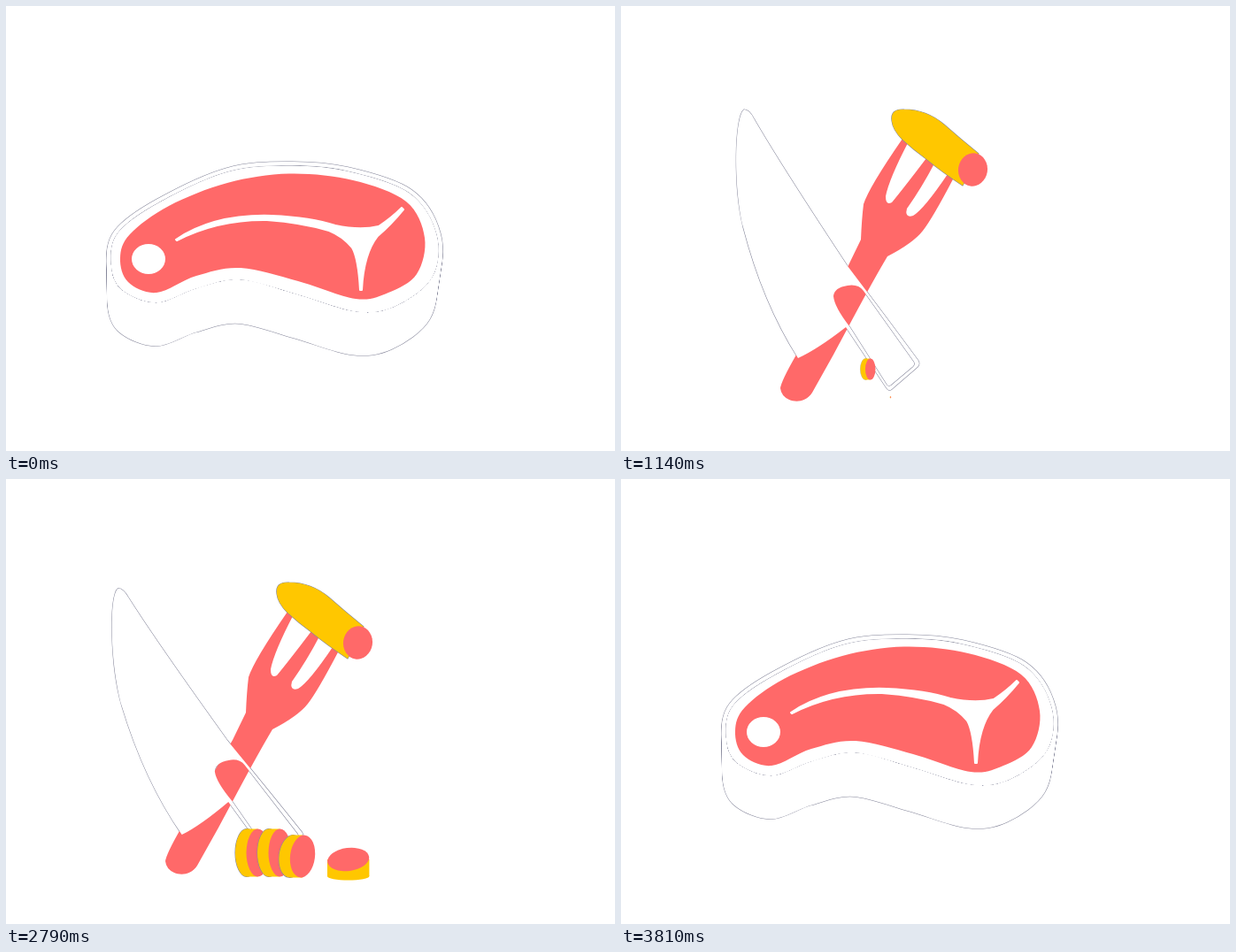
Write an HTML page with a canvas that moves like this. It is 688 px wide and 503 px high and loops after 3.84 s.

```html
<!DOCTYPE html>
<html lang="en">
<head>
<meta charset="utf-8">
<title>Steak and sausage</title>
<style>
  html, body { margin: 0; width: 100%; height: 100%; overflow: hidden; background: #fff; }
  canvas { display: block; }
</style>
</head>
<body>
<canvas width="688" height="503"></canvas>
<script>
const LOOP = 3840, STEP = 30, LAYERS = 24;
const RED = '#ff6969', YELLOW = '#ffc700', WHITE = '#fff', HAIR = '#85869a';
const ctx = document.querySelector('canvas').getContext('2d');

// Key points of the steak: lying at rest, then thrown up.
const rim = [
  '118 292 126 256 172 222 250 187 320 180 385 186 456 211 487 258 482 307 440 340 395 346 330 327 265 310 215 320 170 336 130 321',
  '220 238 228 210 270 187 340 178 410 187 465 213 493 275 486 355 440 422 340 452 272 434 260 380 300 339 313 309 262 286 230 268'
];
const meat = [
  '129 285 140 258 184 226 250 200 320 189.5 392 197 452 221 473 262 464 303 432 324 395 331 330 311 265 296 215 305 170 324 138 312',
  '421 70 440 45 486 18 545 15 620 42 668 110 677 215 632 290 575 319 503 312 491 285 527 245 546 190 514 137 455 115 428 95'
];
const fat = [
  'M192 264Q235 235 300 237Q345 239 372 248Q400 254 421 249Q435 240 447 228L449 230Q435 247 420 260Q404 280 402 321L400 321Q398 285 391 273Q380 260 365 254Q335 245 295 242Q240 241 193 265Z',
  'M331 237Q365 237 385 256Q396 268 397 285Q398 300 396 318Q394 340 399 378L397 378Q393 345 383 343Q366 347 331 352L331 350Q367 345 388 323Q397 310 396 290Q393 262 375 249Q360 240 331 239Z'
];

const fork = new Path2D('M180 432Q181 424 197 396L256 295L271 264Q272 240 274 224Q280 205 318 150L325 153Q303 195 299 215Q299 226 306 222Q320 205 345 172L354 178Q340 205 323 229Q320 240 330 237Q342 230 369 190L376 194Q352 240 341 254Q330 268 301 283Q285 310 262 353Q240 395 216 437C209 448 197 448 190 445Q181 441 180 432Z');
const knife = new Path2D('M139 117Q145 117 150 127Q180 179 256 294Q300 352 336 401Q338 405 335 408L306 433Q303 436 300 432L254 363Q222 388 200 398Q160 335 138 250C127 205 128 125 139 117Z' +
  'M240 328Q241 318 256 316Q268 314 274 322L331 402Q333 405 330 408L305 429Q302 431 300 428L258 362Q241 340 240 328Z');
const sausage = new Path2D('M306 130Q304 116 320 117Q345 117 365 134Q383 150 404 167L386 203Q362 187 345 173Q330 162 318 151Q307 140 306 130Z');

const lerp = (a, b, k) => a + (b - a) * k;

// Blends two strings that differ only in their numbers.
function mix([a, b], k) {
  const target = b.match(/[\d.]+/g);
  let i = 0;
  return a.replace(/[\d.]+/g, n => lerp(+n, +target[i++], k).toFixed(2));
}

// Eased value at time t from [time, value] pairs.
function key(t, ...stops) {
  const i = stops.findIndex(stop => t < stop[0]);
  if (i < 0) return stops[stops.length - 1][1];
  if (i === 0) return stops[0][1];
  const [t0, v0] = stops[i - 1], [t1, v1] = stops[i];
  const u = (t - t0) / (t1 - t0);
  return lerp(v0, v1, u * u * (3 - 2 * u));
}

// Closed smooth curve through a list of points.
function blob(list) {
  const v = list.split(' ').map(Number), n = v.length, path = new Path2D();
  const at = i => v[(i + n) % n];
  path.moveTo(v[0], v[1]);
  for (let i = 0; i < n; i += 2) {
    const out = j => at(j) + (at(j + 2) - at(j - 2)) / 6;
    const into = j => at(j + 2) - (at(j + 4) - at(j)) / 6;
    path.bezierCurveTo(out(i), out(i + 1), into(i), into(i + 1), at(i + 2), at(i + 3));
  }
  path.closePath();
  return path;
}

function oval(x, y, rx, ry, tilt = 0) {
  const path = new Path2D();
  path.ellipse(x, y, rx, ry, tilt, 0, 7);
  return path;
}

function fill(path, color) {
  ctx.fillStyle = color;
  ctx.fill(path, 'evenodd');
}

function line(path, color = HAIR, width = 1.1) {
  ctx.strokeStyle = color;
  ctx.lineWidth = width;
  ctx.lineCap = ctx.lineJoin = 'round';
  ctx.stroke(path);
}

// Draws scaled and turned about x, y, then moved by dx, dy.
function placed(x, y, scale, angle, dx, dy, draw) {
  if (scale <= 0.01) return;
  ctx.save();
  ctx.translate(x + dx, y + dy);
  ctx.rotate(angle);
  ctx.scale(scale, scale);
  ctx.translate(-x, -y);
  draw();
  ctx.restore();
}

// The side wall: the rim swept downwards, leaving the top face open.
function wall(edge, color, width, lift, lean) {
  const open = new Path2D();
  open.rect(-500, -500, 2000, 2000);
  open.addPath(edge);
  const shrink = 0.02 + 0.08 * lift - 0.1 * lean;
  const dx = -3 - 5 * lift - 5 * lean, dy = 46 + 9 * lift - 6 * lean;
  ctx.save();
  ctx.clip(open, 'evenodd');
  for (let i = 0; i <= LAYERS; i++) {
    const k = i / LAYERS;
    placed(lerp(303, 358, lift), lerp(263, 315, lift), 1 - shrink * k, 0, dx * k, dy * k, () => {
      line(edge, color, width);
      fill(edge, color);
    });
  }
  ctx.restore();
}

// lift: 0 at rest, 1 thrown; lean: skew of the landing wobble.
function steak(lift, lean) {
  const edge = blob(mix(rim, lift)), vein = new Path2D(mix(fat, lift));
  const bone = oval(lerp(161, 266, lift), lerp(286, 236, lift), lerp(19, 21, lift), lerp(17, 16, lift));
  ctx.transform(1 - 0.03 * lean, -0.025 * lean, -0.04 * lean, 1, 13 * lean, 5 * lean);
  wall(edge, HAIR, 9, lift, lean);
  line(edge);
  line(vein, HAIR, 3);
  line(bone);
  fill(blob(mix(meat, lift)), RED);
  wall(edge, WHITE, 8, lift, lean);
  line(vein, WHITE, 2);
  fill(vein, WHITE);
  fill(bone, WHITE);
}

function tools(t, sway) {
  const size = key(t, [990, 0], [1140, 1], [1230, 1.15], [1380, 0.97], [1500, 1], [2820, 1], [2970, 0]);
  const turn = key(t, [1140, 0], [1230, -0.04], [1380, 0.02], [1500, 0], [2610, 0], [2790, -0.04], [2940, -0.4]);
  const asKnife = draw => placed(302, 433, 1, turn, -4 * sway, -4 * sway, draw);
  placed(270, 290, size, 0, 0, 0, () => {
    asKnife(() => line(knife));
    placed(0, 0, 1, 0, -2 * sway, 4 * sway, () => fill(fork, RED));
    asKnife(() => fill(knife, WHITE));
    placed(0, 0, 1, 0, -3 * sway, 9 * sway, () => {
      line(sausage);
      fill(sausage, YELLOW);
      fill(oval(397.5, 185, 16.5, 18.7, 0.15), RED);
    });
  });
}

function standingSlice(x, y, rx, ry, tilt) {
  const back = oval(x - 12.5, y, rx, ry, tilt);
  line(back);
  fill(back, YELLOW);
  ctx.fillRect(x - 12.5, y - ry, 12.5, ry * 2);
  fill(oval(x, y, rx, ry, tilt), RED);
}

function lyingSlice(sway) {
  const x = 386.7, y = 430 + 5 * sway, rx = 23.7 + 5 * sway;
  fill(oval(x, 449, rx, 4.5), YELLOW);
  ctx.fillRect(x - rx, y, rx * 2, 449 - y);
  fill(oval(x, y, rx, 13 - 3 * sway, -0.13), RED);
}

function slices(t, sway) {
  const grow = (start, end) =>
    key(t, [start, 0], [start + 130, 1], [start + 190, 1.12], [start + 270, 1], [end, 1], [end + 150, 0]);
  for (let i = 0; i < 3; i++) {
    const size = grow(1080 + 45 * i, 2850), x = 284.5 + 25 * i, small = i === 2;
    const fall = (i % 2 ? 20 : -22) * (1 - Math.min(size, 1));
    placed(x - 5, 423, size, 0, 0, fall, () => small
      ? standingSlice(x + 0.5, 426.5 + 3 * sway, 14 + 2 * sway, 24 - 3 * sway, 0.12)
      : standingSlice(x + sway, 422.5 - sway, 13, 27 + 2 * sway, 0));
  }
  placed(386.7, 453, grow(1215, 3010), 0, 0, 0, () => lyingSlice(sway));
}

function crumbs(t) {
  const size = key(t, [2940, 0], [3060, 1], [3090, 1], [3240, 0]);
  placed(155, 430, size, 0, 0, 0, () => {
    for (const [x, y, tilt] of [[129, 421, 0.5], [134, 434, 0.2], [189, 402, 0], [188, 420.5, -0.5]])
      fill(oval(x, y, 4.5, 3.2, tilt), YELLOW);
    line(new Path2D('M121 439Q138 447 157 448.5'), YELLOW, 6);
  });
}

function render(t) {
  ctx.clearRect(0, 0, 688, 503);
  if (t < 1020) {
    const lift = key(t, [630, 0], [720, -0.03], [900, 1]);
    placed(300, 300, key(t, [915, 1], [1020, 0]), 0, 0, 0, () => steak(lift, 0));
  }
  if (t > 990 && t < 3240) {
    const sway = key(t, [1380, 0], [1530, 1], [1560, 1], [1740, 0]);
    tools(t, sway);
    slices(t, sway);
  }
  if (t >= 2910) {
    const lean = key(t, [2910, 1.8], [3090, 1], [3210, -0.6], [3360, -0.15], [3480, 0.15], [3630, -0.04], [3750, 0]);
    const size = key(t, [2910, 0.3], [3030, 1]);
    const slide = key(t, [2940, -60], [3080, 0]);
    placed(290, 300, size, 0, slide, 0, () => steak(0, lean));
    crumbs(t);
  }
}

let start;
function frame(now) {
  start ??= now;
  render(Math.floor((now - start) % LOOP / STEP) * STEP);
  requestAnimationFrame(frame);
}
requestAnimationFrame(frame);
</script>
</body>
</html>
```
